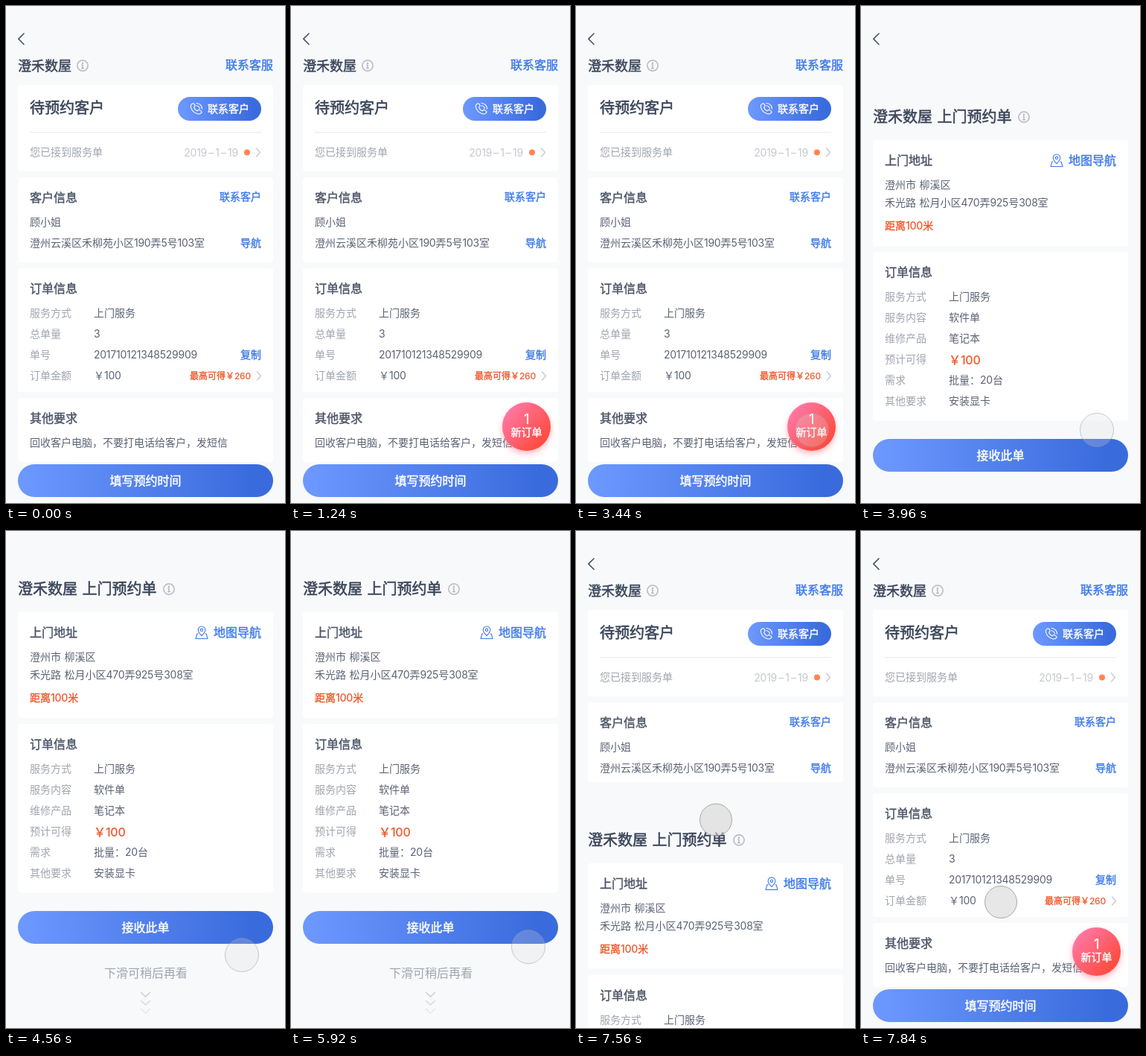
These frames come from a looping animation (375x667 px, 8000 ms). An HTML page:

```html
<!DOCTYPE html>
<html lang="zh-CN">
<head>
<meta charset="utf-8">
<title>预约单</title>
<style>
html, body { margin: 0; width: 100%; height: 100%; overflow: hidden; background: #f8f9fb; }
svg { display: block; width: 375px; height: 667px; }
text { font-family: "Noto Sans CJK SC", "Noto Sans CJK", sans-serif; word-spacing: .1em; }
/* the Chinese font has no medium cut, so a thin outline thickens it */
.medium { font-weight: 500; stroke-width: .028em; }
.num { font-family: Inter, "Noto Sans CJK SC", sans-serif; letter-spacing: -.018em; stroke: none; }
.line { fill: none; stroke-linecap: round; stroke-linejoin: round; }
#badge { filter: drop-shadow(0 4px 4px rgba(255, 80, 110, .4)); }
</style>
</head>
<body>
<svg id="stage" viewBox="0 0 375 667"></svg>
<script>
const DARK = '#3b465a', HEAD = '#4d5668', BODY = '#5b6374', MUTED = '#a0a5af',
      BLUE = '#3f7be8', ORANGE = '#f0572b', WHITE = '#fff';

// y is the vertical middle of the line
const text = (x, y, size, color, str, medium = false, anchor = 'start') =>
  `<text x="${x}" y="${y + size * .37}" font-size="${size}" fill="${color}" text-anchor="${anchor}"
    ${medium ? `class="medium" stroke="${color}"` : ''}>${str.replace(/[\d–\u2009]+/g, '<tspan class="num">$&</tspan>')}</text>`;
const right = (x, y, size, color, str, medium = true) => text(x, y, size, color, str, medium, 'end');
const center = (x, y, size, color, str, medium = true) => text(x, y, size, color, str, medium, 'middle');
const line = (d, color, width = 1.2) => `<path class="line" d="${d}" stroke="${color}" stroke-width="${width}"/>`;
const card = (top, bottom) => `<rect x="16" y="${top}" width="343" height="${bottom - top}" rx="4" fill="#fff"/>`;
const pill = (x, y, w, h) => `<rect x="${x}" y="${y}" width="${w}" height="${h}" rx="${h / 2}" fill="url(#blue)"/>`;
const button = (y, str) => pill(16, y, 343, 44) + center(187.5, y + 22, 16, WHITE, str);
const chevron = (x, y) => line(`M${x} ${y - 5}l5 5.5l-5 5.5`, '#c3c6cd');
const rows = (y, list) => list.map(([label, value], i) =>
  text(32, y + i * 28, 14, MUTED, label) + (value ? text(118, y + i * 28, 14, BODY, value) : '')).join('');
const info = (x, y) => `<circle cx="${x}" cy="${y}" r="7.1" fill="none" stroke="#bfc2c9" stroke-width="1.8"/>
  <circle cx="${x}" cy="${y - 3.3}" r="1.2" fill="#b4b8c0"/>` +
  line(`M${x - 1} ${y - .8}h1v4.4m-1.3 0h2.6`, '#b4b8c0', 1.5);

const home = [
  line('M24 37L16.8 44.2L24 51.5', HEAD, 1.7),
  text(16, 80, 18, DARK, '澄禾数屋', true), info(103, 80),
  right(359, 79, 16, BLUE, '联系客服'),

  card(106, 222),
  text(32, 137, 20, DARK, '待预约客户', true),
  pill(231, 122, 112, 32),
  line('M250.2 131.2q-2.2 1-1.8 4q1 7 9.3 9.6q3 .8 5-1.6q.8-1.2-.4-2.1l-2.2-1.5q-1-.6-1.9.3q-1 1.2-2.2.4q-2-1.4-3-3.3q-.6-1.2.5-2q.9-.9.4-1.9l-1.2-1.7q-.9-1.2-2.5-.2zM256 130.5q7 .4 7.5 7.5M256 133.7q4 .4 4.3 4.3', WHITE, 1.1),
  text(271, 138, 14, WHITE, '联系客户', true),
  '<rect x="32" y="169" width="311" height="1" fill="#e8eaed"/>',
  text(32, 196, 14, MUTED, '您已接到服务单'),
  right(312, 197, 14, '#c5c8cf', '2019\u2009–\u20091\u2009–\u200919', false),
  '<circle cx="324" cy="196.5" r="4" fill="#ff8550"/>', chevron(336.5, 196),

  card(230, 344),
  text(32, 257, 16, HEAD, '客户信息', true),
  right(343, 256, 14, BLUE, '联系客户'),
  text(32, 290, 14, BODY, '顾小姐'),
  text(32, 318, 14, BODY, '澄州云溪区禾柳苑小区190弄5号103室'),
  right(343, 318, 14, BLUE, '导航'),

  card(352, 518),
  text(32, 379.5, 16, HEAD, '订单信息', true),
  rows(412, [['服务方式', '上门服务'], ['总单量', '3'], ['单号', '201710121348529909'], ['订单金额', '￥100']]),
  right(343, 468, 14, BLUE, '复制'),
  right(329, 496.5, 12, ORANGE, '最高可得￥260'), chevron(337.5, 496),

  card(526, 612),
  text(32, 553, 16, HEAD, '其他要求', true),
  text(32, 586, 14, BODY, '回收客户电脑，不要打电话给客户，发短信'),
  button(615, '填写预约时间')
].join('');

const badge = `<g id="badge"><circle r="32.5" fill="url(#red)"/>` +
  center(0, -10.5, 18, WHITE, '1') + center(0, 7.5, 14, WHITE, '新订单') + '</g>';

const hint = center(188, 593, 16, MUTED, '下滑可稍后再看', false) +
  ['#c6c9cf', '#d6d8dd', '#e3e5e8'].map((c, i) => line(`M181.5 ${619.5 + i * 11}l6 5.5l6-5.5`, c, 1.3)).join('');

const sheet = [
  '<rect width="375" height="667" fill="#f8f9fb"/>',
  text(16, 78, 20, DARK, '澄禾数屋 上门预约单', true), info(219, 78),

  card(109, 251),
  text(32, 136.5, 16, HEAD, '上门地址', true),
  line('M263 140.5q-4.8-4.6-4.8-7.7a4.8 4.8 0 0 1 9.6 0q0 3.1-4.8 7.7zM258 138h-1.2l-1.8 6.5h16l-1.8-6.5h-1.2', BLUE, 1.1),
  `<circle cx="263" cy="132.8" r="1.7" fill="none" stroke="${BLUE}" stroke-width="1.1"/>`,
  right(343, 136.5, 16, BLUE, '地图导航'),
  text(32, 169, 14, BODY, '澄州市 柳溪区'),
  text(32, 193, 14, BODY, '禾光路 松月小区470弄925号308室'),
  text(32, 224, 14, ORANGE, '距离100米', true),

  card(259, 485.5),
  text(32, 286, 16, HEAD, '订单信息', true),
  rows(319, [['服务方式', '上门服务'], ['服务内容', '软件单'], ['维修产品', '笔记本'],
    ['预计可得'], ['需求', '批量：20台'], ['其他要求', '安装显卡']]),
  text(118, 404, 16, ORANGE, '￥100', true),
  `<g id="hint">${hint}</g>`,
  button(510, '接收此单')
].join('');

const $ = id => document.getElementById(id);
$('stage').innerHTML = `<defs>
  <linearGradient id="blue"><stop stop-color="#6d99ff"/><stop offset=".92" stop-color="#3a6bdd"/></linearGradient>
  <linearGradient id="red" x1=".1" y1=".15" x2=".85" y2=".85">
    <stop stop-color="#ff78a6"/><stop offset="1" stop-color="#ff4a3c"/></linearGradient>
</defs>${home}${badge}<g id="sheet">${sheet}</g><circle id="touch" fill="#d8d8d8" stroke="#979797"/>`;

const part = (t, from, to) => Math.min(1, Math.max(0, (t - from) / (to - from)));
const inOut = p => p < .5 ? 2 * p * p : 1 - 2 * (1 - p) ** 2;
const bezier = (p, a, b) => 3 * p * (1 - p) ** 2 * a + 3 * p * p * (1 - p) * b + p ** 3;
// same curve as the CSS "ease" keyword
function ease(x) {
  let lo = 0, hi = 1;
  for (let i = 0; i < 20; i++) {
    const mid = (lo + hi) / 2;
    if (bezier(mid, .25, .25) < x) lo = mid; else hi = mid;
  }
  return bezier(lo, .1, 1);
}
const spring = p => p <= 0 ? 0 : p >= 1 ? 1 : 1 - Math.exp(-5.6 * p) * Math.cos(9 * p);

// start, end, then from / control / to points
const moves = [
  [2480, 3120, [220, 692], [260, 638], [300, 585]],
  [3280, 3440, [300, 585], [308, 577], [317, 569]],
  [5760, 6440, [317, 569], [329, 520], [288, 473]],
  [6920, 7320, [288, 473], [238, 473], [188, 328]],
  [7360, 7840, [188, 328], [188, 413], [188, 498]]
];
function touchAt(t) {
  const [from, to, a, c, b] = moves.filter(m => t >= m[0]).pop() || moves[0];
  const p = inOut(part(t, from, to));
  return [0, 1].map(i => (1 - p) ** 2 * a[i] + 2 * p * (1 - p) * c[i] + p * p * b[i]);
}

function draw(t) {
  $('badge').setAttribute('transform', `translate(316.5 564.5) scale(${spring(part(t, 440, 1240))})`);

  const shown = ease(part(t, 3716, 4116)) - inOut(part(t, 7360, 7760));
  $('sheet').setAttribute('transform', `translate(0 ${667 * (1 - shown)})`);

  const h = inOut(part(t, 4240, 4560));
  $('hint').setAttribute('transform', `translate(0 ${-26 * (1 - h)})`);
  $('hint').setAttribute('opacity', h);

  const [x, y] = touchAt(t), pressed = t >= 3600 && t < 3760 || t >= 7360;
  const set = { cx: x, cy: y, r: pressed ? 21.5 : 22.5,
    'fill-opacity': pressed ? .6 : .24, 'stroke-opacity': pressed ? .8 : .5 };
  for (const k in set) $('touch').setAttribute(k, set[k]);
}

const start = performance.now();
function frame() {
  draw((performance.now() - start) % 8000);
  requestAnimationFrame(frame);
}
frame();
</script>
</body>
</html>
```
